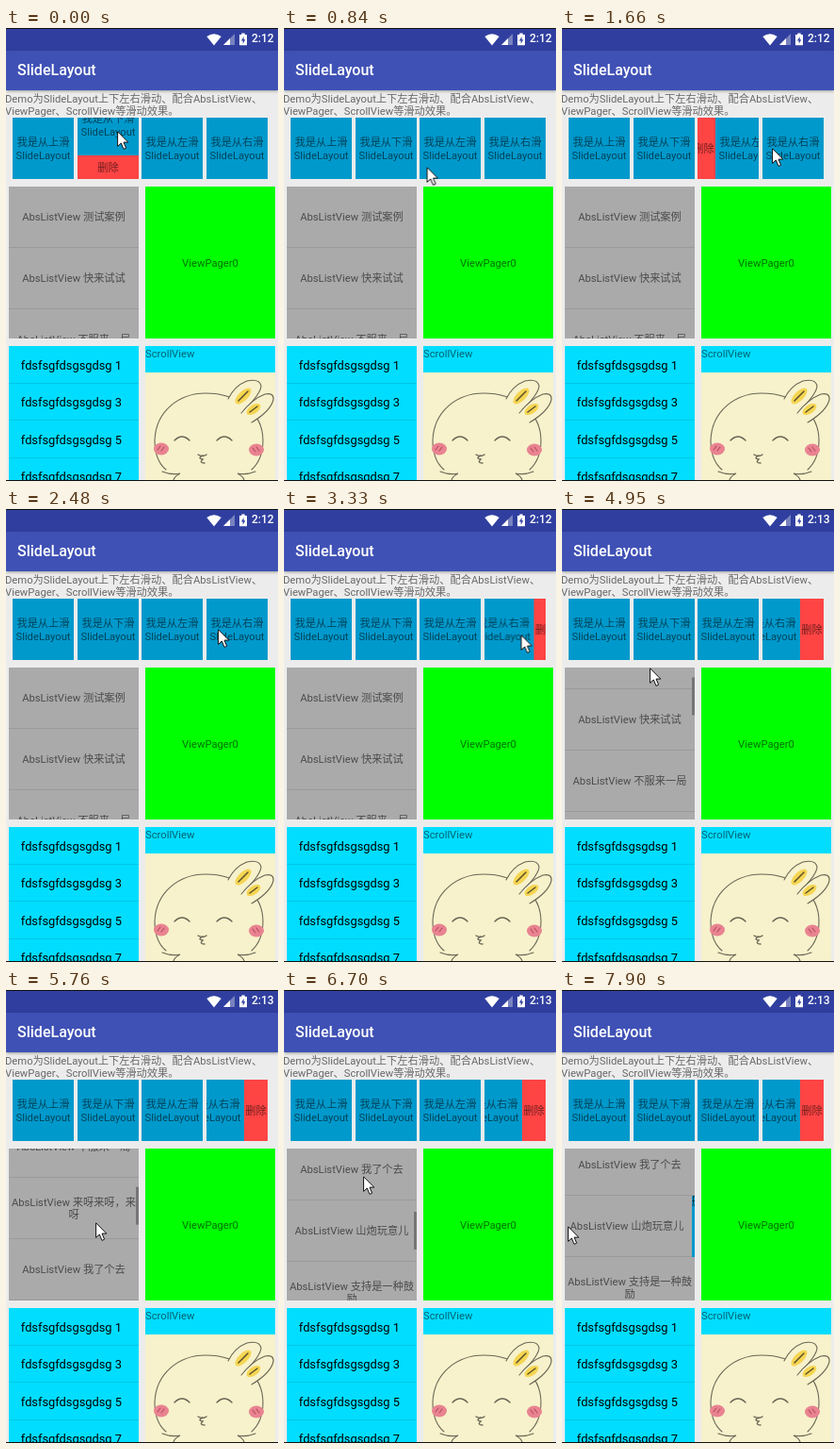
Animation, 289 px wide and 480 px high, one loop 8000 ms. Source, as an HTML page:

```html
<!DOCTYPE html>
<html lang="zh">
<head>
<meta charset="utf-8">
<title>SlideLayout</title>
<style>
@property --s { syntax: '<number>'; inherits: true; initial-value: 0; }
html, body { margin: 0; width: 100%; height: 100%; overflow: hidden; }
body {
  position: relative; background: #ececec; color: rgba(0,0,0,.56);
  font: 11.24px/13.4px Roboto, "Noto Sans CJK SC", "Noto Sans CJK", sans-serif;
  white-space: nowrap;
}
body * { box-sizing: border-box; }
body > *, .slide > *, .clock span { position: absolute; }
.anim { animation: 8s step-end infinite; }

.status { left: 0; top: 0; width: 289px; height: 24px; background: #303f9f; border-top: 1px solid #111; }
.bar {
  left: 0; top: 24px; width: 289px; height: 42px; background: #3f51b5; color: #fff;
  font-size: 16px; font-weight: 500; line-height: 42px; padding-left: 12px;
  box-shadow: 0 1px 3px rgba(0,0,0,.35);
}
.icons { left: 0; top: 1px; }
.clock { left: 261px; top: 5px; color: #fff; font-size: 12px; font-weight: 500; }
.c1 { animation-name: hide; }
.c2 { animation-name: show; }
@keyframes hide { 0% { opacity: 1 } 58.875%, 100% { opacity: 0 } }
@keyframes show { 0% { opacity: 0 } 58.875%, 100% { opacity: 1 } }
.intro { left: -1px; top: 69px; }

.tile { top: 95px; width: 65px; height: 65px; overflow: hidden; background: #09c; }
.slide { position: absolute; inset: 0; }
.mid { display: flex; align-items: center; justify-content: center; text-align: center; padding-top: 2px; }
.face { inset: 0; }
.del { background: #f44; }
.down .del { left: 0; top: 65px; width: 65px; height: 25px; }
.left .del { left: -25px; width: 25px; height: 65px; }
.right .del { left: 65px; width: 25px; height: 65px; }
.down { animation-name: down; }
.left { animation-name: left; }
.right { animation-name: right; }
@keyframes down {
  0% { transform: translateY(-25px) }
  1.5% { transform: translateY(-21px); animation-timing-function: steps(3) }
  6.75%, 100% { transform: none }
}
@keyframes left {
  0% { transform: none }
  15.375% { transform: translateX(2px); animation-timing-function: steps(3) }
  20.75% { transform: translateX(19px) }
  22.5% { transform: translateX(25px) }
  23.9% { transform: translateX(25px); animation-timing-function: steps(4) }
  31%, 100% { transform: none }
}
@keyframes right {
  0% { transform: none }
  36.25% { transform: none; animation-timing-function: steps(4) }
  43.5%, 100% { transform: translateX(-25px) }
}

.list { left: 3px; top: 168px; width: 138px; height: 161px; overflow: hidden; background: #aaa; animation-name: scroll; }
.rows { transform: translateY(calc(var(--s) * -1px)); }
.rows > div { position: relative; height: 65px; border-bottom: 1px solid #9a9a9a; }
.peek { animation-name: peek; }
.more { left: 138px; top: 0; width: 138px; height: 65px; background: #09c; color: rgba(0,0,0,.8); }
.thumb {
  position: absolute; right: 0; top: 0; width: 3.2px; height: 40px; background: #767676;
  transform: translateY(calc(var(--s) * .248px)); animation-name: thumb;
}
@keyframes scroll {
  0% { --s: 0 }
  53.875% { --s: 0; animation-timing-function: steps(5) }
  61.875% { --s: 42; animation-timing-function: steps(6) }
  72% { --s: 164; animation-timing-function: steps(4) }
  79.125% { --s: 268 }
  83.75% { --s: 270; animation-timing-function: steps(2) }
  87.25%, 100% { --s: 275 }
}
@keyframes thumb {
  0% { opacity: 0 }
  55.4% { opacity: 1 }
  89% { opacity: 1; animation-timing-function: steps(4) }
  95.375%, 100% { opacity: 0 }
}
@keyframes peek {
  0% { transform: none }
  96.875% { transform: translateX(-1px) }
  98.75%, 100% { transform: translateX(-3px) }
}

.pager { left: 148px; top: 168px; width: 138px; height: 161px; background: #0f0; }
.names {
  left: 3px; top: 337px; width: 138px; height: 142px; padding-top: .7px; overflow: hidden;
  background: #0df; color: #000; font-size: 12.84px;
}
.names div { height: 39.3px; border-bottom: 1px solid #00c6e5; justify-content: flex-start; padding-left: 12.84px; }
.head { left: 148px; top: 337px; width: 138px; height: 28px; background: #0df; padding-top: 2px; }
.art { left: 148px; top: 365px; }
.foot { left: 0; top: 479px; width: 289px; height: 1px; background: #111; }

.cursor { left: 0; top: 1px; animation-name: cursor; }
@keyframes cursor {
  0% { transform: translate(118px,108px) }
  1.5% { transform: translate(118px,114px); animation-timing-function: steps(3) }
  6.75% { transform: translate(121px,164px); animation-timing-function: steps(4) }
  13.875% { transform: translate(182px,128px); animation-timing-function: steps(4) }
  20.75% { transform: translate(223px,126px) }
  22.5% { transform: translate(225px,126px); animation-timing-function: steps(3) }
  27.25% { transform: translate(206px,126px) }
  29.125% { transform: translate(210px,126px) }
  31% { transform: translate(225px,126px); animation-timing-function: steps(3) }
  36.25% { transform: translate(273px,130px); animation-timing-function: steps(4) }
  43.5% { transform: translate(230px,134px); animation-timing-function: steps(4) }
  50.625% { transform: translate(87px,223px); animation-timing-function: steps(3) }
  55.625% { transform: translate(92px,317px) }
  57.375% { transform: translate(92px,290px); animation-timing-function: steps(3) }
  61.875% { transform: translate(93px,167px); animation-timing-function: steps(3) }
  66.8% { transform: translate(94px,312px); animation-timing-function: steps(3) }
  72% { transform: translate(95px,245px); animation-timing-function: steps(4) }
  79.125% { transform: translate(92px,190px) }
  83.75% { transform: translate(84px,196px); animation-timing-function: steps(6) }
  95.375% { transform: translate(14px,249px) }
  96.875% { transform: translate(10px,249px) }
  98.75%, 100% { transform: translate(6px,249px) }
}
</style>
</head>
<body>
<div class="intro">Demo为SlideLayout上下左右滑动、配合AbsListView、<br>ViewPager、ScrollView等滑动效果。</div>
<div class="status"></div>
<div class="bar">SlideLayout</div>
<svg class="icons" width="289" height="23" fill="#fff">
  <path d="M221 17.5 213.3 8Q221 2.6 228.7 8Z"/>
  <path d="M231 17H243V5Z" opacity=".35"/>
  <path d="M231 17H238V10Z"/>
  <path d="M248 6h2.3V4.6h3.4V6H256v11.3h-8Z"/>
  <path d="M252.6 8 250 12.4h1.7v3.4l2.6-4.6h-1.7Z" fill="#303f9f"/>
</svg>
<div class="clock"><span class="anim c1">2:12</span><span class="anim c2">2:13</span></div>

<div class="tile" style="left:7px"><div class="slide"><div class="face mid">我是从上滑<br>SlideLayout</div></div></div>
<div class="tile" style="left:76px"><div class="slide anim down"><div class="face mid">我是从下滑<br>SlideLayout</div><div class="del mid">删除</div></div></div>
<div class="tile" style="left:144px"><div class="slide anim left"><div class="face mid">我是从左滑<br>SlideLayout</div><div class="del mid">删除</div></div></div>
<div class="tile" style="left:213px"><div class="slide anim right"><div class="face mid">我是从右滑<br>SlideLayout</div><div class="del mid">删除</div></div></div>

<div class="list anim">
  <div class="rows">
    <div class="mid">AbsListView 测试案例</div>
    <div class="mid">AbsListView 快来试试</div>
    <div class="mid">AbsListView 不服来一局</div>
    <div class="mid">AbsListView 来呀来呀，来<br>呀</div>
    <div class="mid">AbsListView 我了个去</div>
    <div><div class="slide anim peek"><div class="face mid">AbsListView 山炮玩意儿</div><div class="more">删除</div></div></div>
    <div class="mid">AbsListView 支持是一种鼓<br>励</div>
  </div>
  <div class="thumb anim"></div>
</div>

<div class="pager mid">ViewPager0</div>
<div class="names">
  <div class="mid">fdsfsgfdsgsgdsg 1</div>
  <div class="mid">fdsfsgfdsgsgdsg 3</div>
  <div class="mid">fdsfsgfdsgsgdsg 5</div>
  <div class="mid">fdsfsgfdsgsgdsg 7</div>
</div>
<div class="head">ScrollView</div>

<svg class="art" width="138" height="114" viewBox="148 365 138 114" fill="none" stroke="#6b6656" stroke-width="1.1" stroke-linecap="round">
  <path d="M148 365h138v114H148Z" fill="#f7f2cb" stroke="none"/>
  <path d="M170 468Q158 458 158 437C159 406 184 387 212 387 246 387 273 407 273 437Q273 457 261 468"/>
  <path d="M166 470Q176 474 185 472 179 475 178 479M265 470Q255 474 246 472 252 475 253 479"/>
  <g fill="#f7f2cb">
    <path d="M236 393Q243 379 256 374 269 371 271 379 271 387 254 404"/>
    <path d="M250 408Q262 393 275 388 285 386 284 394 281 406 261 418"/>
  </g>
  <g fill="#f5d552" stroke="none">
    <ellipse cx="252" cy="390" rx="11" ry="5" transform="rotate(-45 252 390)"/>
    <ellipse cx="263" cy="404" rx="8.5" ry="4.5" transform="rotate(-35 263 404)"/>
  </g>
  <path d="M247 395 257 385M259 407 267 401" stroke="#5c5028" stroke-width="1.5"/>
  <g fill="#e98391" stroke="none">
    <ellipse cx="165" cy="446" rx="8" ry="6.5"/>
    <ellipse cx="266" cy="447" rx="8" ry="6.5"/>
  </g>
  <path d="M161 447l3-4M165 448l3-4M262 445l3 4M266 444l3 4" stroke="#b64c5c"/>
  <path d="M179 437Q187 429 195 437M224 437Q232 429 240 437M204 452Q209 455 213 452M209 453Q203 456 209 457 205 461 211 461" stroke-width="1.4"/>
</svg>
<div class="foot"></div>

<svg class="cursor anim" width="14" height="22" fill="#fff" stroke="#111" stroke-linejoin="round">
  <path d="M.6.8V16.4L4.3 13 7 19.4 9.6 18.2 7 12.1H11.8Z"/>
</svg>
</body>
</html>
```
